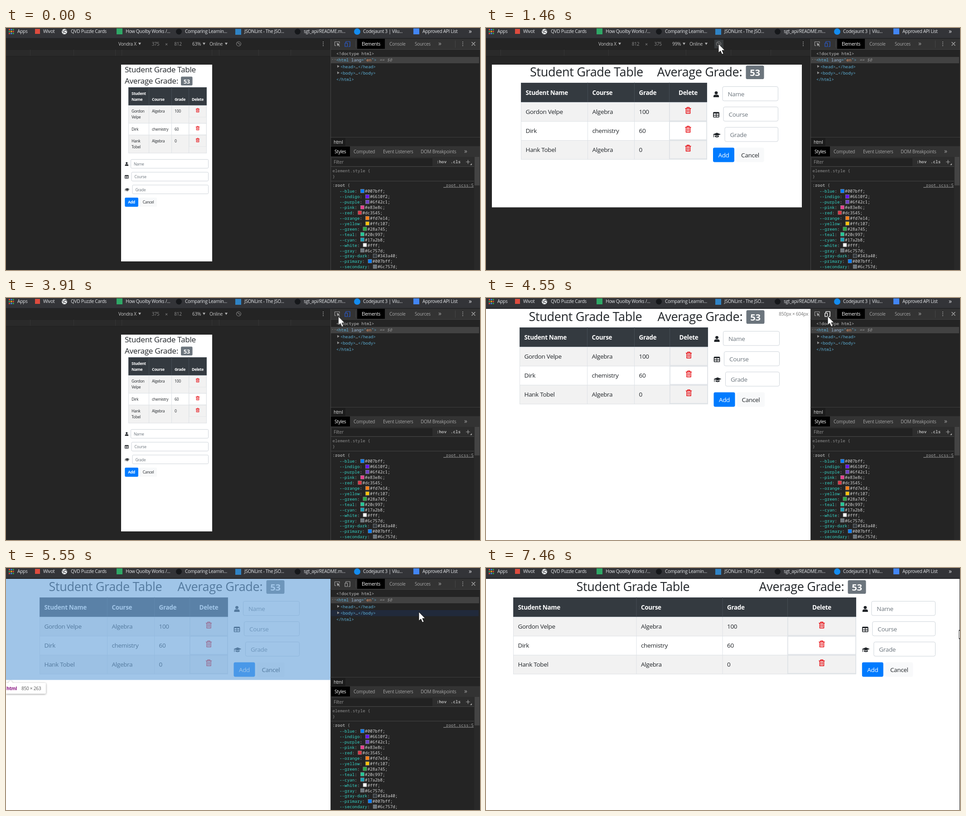
Animation, 1046 px wide and 535 px high, one loop 8 s. Source, as an HTML page:

```html
<!DOCTYPE html>
<html lang="en">
<head>
<meta charset="utf-8">
<title>Responsive grade table</title>
<style>
html, body { margin: 0; width: 100%; height: 100%; overflow: hidden; background: #242424; }
svg { display: block; width: 1046px; height: 535px; font-family: "Open Sans", "Noto Sans", sans-serif; letter-spacing: -.02em; }
text { white-space: pre; }
.mono { font-family: "Noto Sans Mono", "DejaVu Sans Mono", monospace; letter-spacing: 0; }
.line { fill: none; stroke-linecap: round; stroke-linejoin: round; }

/* 80 ms are one percent */
.timed { animation: 8s step-end infinite; }
#portrait { animation-name: portrait; }
#landscape { animation-name: landscape; }
#device { animation-name: device; }
#desktop { animation-name: desktop; }
#size { animation-name: size; }
#panel { animation-name: panel; }
#wide { animation-name: wide; }
#rotateHover { animation-name: rotate-hover; }
#iconHover { animation-name: icon-hover; }
#overlay { animation-name: overlay; }
#bodyRow { animation-name: body-row; }
#clicks { animation-name: clicks; }
#closeTip { animation-name: close-tip; }
#pointer { animation: move 8s linear infinite, appear 8s step-end infinite; }

@keyframes portrait { 0%, 30.875% { opacity: 1 } 18.25%, 56%, 100% { opacity: 0 } }
@keyframes landscape { 0%, 30.875%, 100% { opacity: 0 } 18.25% { opacity: 1 } }
@keyframes device { 0% { opacity: 1 } 56%, 100% { opacity: 0 } }
@keyframes desktop { 0%, 79.375%, 100% { opacity: 0 } 56% { opacity: 1 } }
@keyframes size { 0%, 66.4%, 100% { opacity: 0 } 56% { opacity: 1 } }
@keyframes panel { 0% { opacity: 1 } 79.375%, 100% { opacity: 0 } }
@keyframes wide { 0% { opacity: 0 } 79.375%, 100% { opacity: 1 } }
@keyframes rotate-hover { 0%, 43%, 100% { opacity: 0 } 13.6% { opacity: 1 } }
@keyframes icon-hover { 0%, 64.5%, 100% { opacity: 0 } 56% { opacity: 1 } }
@keyframes overlay { 0%, 71.5%, 100% { opacity: 0 } 66.4% { opacity: 1 } }
@keyframes body-row { 0%, 71.5%, 100% { opacity: 0 } 68.2% { opacity: 1 } }
@keyframes clicks {
  0%, 18.25%, 30.875%, 56.875%, 79.375%, 100% { opacity: 0 }
  16%, 28%, 55%, 78.5% { opacity: 1 }
}
@keyframes close-tip { 0%, 79.375%, 100% { opacity: 0 } 78.5% { opacity: 1 } }
@keyframes appear { 0% { opacity: 0 } 1.75%, 100% { opacity: 1 } }
@keyframes move {
  0%, 1.75% { transform: translate(912px, 522px); animation-timing-function: ease-in-out }
  11.125% { transform: translate(552px, 78px); animation-timing-function: ease-out }
  14.5%, 42.125% { transform: translate(513px, 35px); animation-timing-function: ease-in-out }
  45.875%, 47% { transform: translate(716px, 41px); animation-timing-function: ease-out }
  53.125%, 63.625% { transform: translate(754px, 40px); animation-timing-function: ease-in-out }
  69.375%, 70.5% { transform: translate(911px, 97px); animation-timing-function: ease-in }
  73.5% { transform: translate(985px, 62px); animation-timing-function: ease-out }
  77.5%, 79.5% { transform: translate(1026px, 33px); animation-timing-function: ease-in-out }
  84.5% { transform: translate(1035px, 126px) }
  88.375%, 92.375% { transform: translate(1037px, 130px) }
  93.25%, 100% { transform: translate(1044px, 137px) }
}
</style>
</head>
<body>
<svg id="stage" viewBox="0 0 1046 535" xmlns="http://www.w3.org/2000/svg"></svg>
<script>
const rect = (x, y, w, h, fill, more = '') =>
  `<rect x="${x}" y="${y}" width="${w}" height="${h}" fill="${fill}" ${more}/>`;
const dot = (x, y, r, fill) => `<circle cx="${x}" cy="${y}" r="${r}" fill="${fill}"/>`;
const path = (d, stroke, w = 1) => `<path class="line" d="${d}" stroke="${stroke}" stroke-width="${w}"/>`;
const shape = (d, fill) => `<path d="${d}" fill="${fill}"/>`;
// text is placed by the middle of its capitals
const text = (x, mid, size, fill, str, more = '') =>
  `<text x="${x}" y="${mid + size * .357}" font-size="${size}" fill="${fill}" ${more}>${str}</text>`;
const at = (x, y, k, body) => `<g transform="translate(${x} ${y}) scale(${k})">${body}</g>`;
const timed = (id, body) => `<g id="${id}" class="timed">${body}</g>`;
const esc = s => s.replace(/</g, '&lt;');

const BOLD = 'font-weight="700"', MID = 'text-anchor="middle"', INK = '#212529', EDGE = '#dee2e6';

const students = [['Gordon Velpe', 'Algebra', '100'], ['Dirk', 'chemistry', '60'], ['Hank Tobel', 'Algebra', '0']];
const fields = ['Name', 'Course', 'Grade'];

const trash = path('M-6-4.5H6M-2.5-4.5V-6.7H2.5V-4.5M-4.5-4.5V6.5H4.5V-4.5M-1.6-2V4M1.6-2V4', '#e6060c', 1.5);
const icons = [
  dot(0, -3.2, 3.4, INK) + shape('M-6 6.5V4.5Q-6 1-2.5 1H2.5Q6 1 6 4.5V6.5Z', INK),
  rect(-6, -5, 12, 10.5, 'none', `rx="1" stroke="${INK}" stroke-width="1.7"`) +
    rect(-6, -5.5, 12, 3, INK) + path('M0-3V5M-6 1.3H6', INK, 1.5),
  shape('M-8.5-1.6L0-5 8.5-1.6 0 2Z M-4.5 1.3V4Q0 6.5 4.5 4V1.3L0 3.2Z', INK) + path('M-7-1V4.5', INK, 1.2)
];

function input(i, x, y, right, h, k) {
  return rect(x + .5, y + .5, right - x - 1, h - 1, '#fff', `rx="${3.4 * k}" stroke="#ced4da"`) +
    text(x + (k < 1 ? 7 : 12), y + h / 2 + .8, 13.5 * k, '#6c757d', fields[i]);
}

function buttons(x, y, k) {
  return rect(x, y, 47 * k, 32 * k, '#007bff', `rx="${3.4 * k}"`) +
    text(x + 23.5 * k, y + 16.5 * k, 13.5 * k, '#fff', 'Add', MID + (k < 1 ? ' ' + BOLD : '')) +
    rect(x + 51.5 * k, y, 61 * k, 32 * k, '#f8f9fa', `rx="${3.4 * k}"`) +
    text(x + 82 * k, y + 16.5 * k, 13.5 * k, INK, 'Cancel', MID);
}

function heading(x, mid, size, str) {
  return text(x, mid, size, INK, str, 'font-weight="500"');
}

function badge(x, y, w, h, size) {
  return rect(x, y, w, h, '#6c757d', `rx="${w / 12}"`) +
    text(x + w / 2, y + h / 2 + 1, size, '#fff', '53', MID + ' ' + BOLD);
}

// cols: five vertical edges, tops: row edges from the header down
function grid(cols, tops) {
  const w = cols[4] - cols[0];
  let out = rect(cols[0], tops[0], w, tops[1] - tops[0], '#343a40');
  for (let r = 1; r < 4; r++) {
    const y = tops[r], h = tops[r + 1] - y;
    out += rect(cols[0], y, w, h, r % 2 ? '#f2f2f2' : '#fff') +
      rect(cols[0] + .5, y + .5, w - 1, h, 'none', `stroke="${EDGE}"`);
  }
  for (const x of cols.slice(1, 4))
    out += path(`M${x + .5} ${tops[0]}V${tops[1]}`, '#454d55') + path(`M${x + .5} ${tops[1]}V${tops[4]}`, EDGE);
  return out + rect(cols[0] + .5, tops[0] + .5, w - 1, tops[1] - tops[0] - 1, 'none', 'stroke="#454d55"');
}

function page({ title, avg, cols, form, right }) {
  const tops = [65, 108, 150, 192, 234], pad = 10.5;
  let out = heading(title, 41.5, 27, 'Student Grade Table') + heading(avg, 41.5, 27, 'Average Grade:') +
    badge(avg + 196, 27, 40, 30, 20.3) + grid(cols, tops);
  ['Student Name', 'Course', 'Grade'].forEach((s, i) => out += text(cols[i] + pad, 86.8, 13.5, '#fff', s, BOLD));
  const mid = (cols[3] + cols[4]) / 2;
  out += text(mid, 86.8, 13.5, '#fff', 'Delete', MID + ' ' + BOLD);
  students.forEach((row, r) => {
    row.forEach((s, i) => out += text(cols[i] + pad, 129.3 + r * 42, 13.5, INK, s));
    out += rect(cols[3] + 1, tops[r + 1] + 1, cols[4] - cols[3] - 2, 40, 'none', `stroke="${EDGE}" stroke-width="1.5"`) +
      at(mid, 126.3 + r * 41.7, 1, trash);
  });
  fields.forEach((_, i) => {
    const y = 73 + i * 45;
    out += at(form + (i === 2 ? 8.5 : 7), y + 17.5, 1, icons[i]) + input(i, form + [20.5, 22.5, 25.5][i], y, right, 32.5, 1);
  });
  return out + buttons(form, 208.5, 1);
}

function phone() {
  const cols = [270, 315, 365, 403, 443], tops = [131, 171, 210, 236, 276], k = .63;
  const put = (x, y, s, fill = INK, more = '') => text(x, y, 8.55, fill, s, more);
  const stack = (x, y, s, ...more) => s.split(' ').map((w, i) => put(x, y + i * 13, w, ...more)).join('');
  let out = rect(254, 81, 201, 435, '#fff') + heading(262, 92, 17.2, 'Student Grade Table') +
    heading(262, 117, 17.2, 'Average Grade:') + badge(386, 107.5, 25.5, 19.5, 12.9) + grid(cols, tops) +
    stack(277, 145, 'Student Name', '#fff', BOLD) + put(322, 158, 'Course', '#fff', BOLD) +
    put(372, 158, 'Grade', '#fff', BOLD) + put(423, 158, 'Delete', '#fff', BOLD + ' ' + MID);
  students.forEach(([name, course, grade], r) => {
    const y = [184, 223.5, 250][r];
    out += stack(277, y, name) + put(322, y, course) + put(372, y, grade) +
      rect(404, tops[r + 1] + 1, 38, 25, 'none', `stroke="${EDGE}" stroke-width=".7"`) + at(423, y - 2, k, trash);
  });
  fields.forEach((_, i) => {
    const y = 290 + i * 28.3;
    out += at(i === 2 ? 267.5 : 266.3, y + 10.7, k, icons[i]) + input(i, [275, 276.5, 278.5][i], y, 447, 20.5, k);
  });
  return out + buttons(262.3, 375, k);
}

function bookmarks() {
  const put = (x, s) => text(x, 7.8, 10.2, '#e4e6e9', s);
  const colors = ['#ea4335', '#fbbc05', '#34a853', '#4285f4'];
  let out = rect(0, 0, 1046, 24, '#333438') + rect(0, 22, 1046, 2, '#242528');
  for (let i = 0; i < 9; i++) out += rect(6 + i % 3 * 4.3, 2 + (i / 3 | 0) * 4.3, 3, 3, colors[(i * 3 + (i / 3 | 0)) % 4]);
  out += rect(64, 2, 11, 11, '#dd4b3e') + dot(129, 8, 6, '#f1f3f4') +
    path('M124 6Q127 9 129 6T134 7M126 11Q129 8 132 11', '#4a4c50', 1.4) +
    rect(244, 1, 13, 13, '#2fa866') + dot(381.5, 8, 6.5, '#16181b') + rect(506, 2, 13, 13, '#2f83c5') +
    dot(643.5, 8, 6.5, '#16181b') + dot(775, 8, 7, '#148cf0') + rect(899, 1, 13, 13, '#4285f4');
  [[25, 'Apps'], [82, 'Wivot'], [143, 'QVD Puzzle Cards'], [264, 'How Quolby Works /...'],
   [395, 'Comparing Learnin...'], [526, 'JSONLint - The JSO...'], [657, 'sgt_api/README.m...'],
   [788, 'Codejaunt 3 | Vilu...'], [919, 'Approved API List']].forEach(b => out += put(...b));
  return out + text(1021, 6.5, 14, '#e4e6e9', '»');
}

const dots = (x, c) => [31, 35, 39].map(y => dot(x, y, 1, c)).join('');
const caret = x => shape(`M${x - 3} 32.5H${x + 3}L${x} 37.5Z`, '#b4b4b4');

function deviceBar() {
  return rect(0, 24, 716, 511, '#252525') + rect(0, 24, 716, 23, '#242424') + rect(0, 47, 716, 15, '#2a2a2a') +
    path('M0 47.5H716M0 62.5H716', '#202020') +
    text(248, 35.5, 10.1, '#c6c6c6', 'Vondra X') + caret(295) + text(354, 36, 11, '#8b8b8b', '×', MID) +
    caret(437) + text(449, 35.5, 10.1, '#c6c6c6', 'Online') + caret(486) +
    timed('rotateHover', rect(504, 26, 20, 19, '#383b3d')) +
    `<circle cx="513.5" cy="35" r="5" fill="none" stroke="#8c8c8c"/>` + path('M510 31.5L517 38.5M513 32.5L516 35.5', '#8c8c8c') +
    dots(700, '#a8a8a8');
}

function deviceSize(w, h, zoom, ticks) {
  return text(330, 35.5, 10.1, '#8b8b8b', w, MID) + text(379.5, 35.5, 10.1, '#8b8b8b', h, MID) +
    text(411, 35.5, 10.1, '#c6c6c6', zoom) + path(ticks.map(x => `M${x + .5} 48V61`).join(''), '#353535');
}

const inspect = path('M728 39H725.5V30.5H736V33', '#a5a5a5', 1.1) + shape('M730 33L737 36 734 37 737 40 735.7 41 733 38 731.5 40.5Z', '#a5a5a5');
const toggle = c => path('M750 33V30H759V41H756M748 33.5H753.5V41H748Z', c, 1.2);

const code = (x, mid, fill, str, more = '') => text(x, mid, 9.27, fill, str, 'class="mono" ' + more);

function tree() {
  const tag = '#5db0d7', tri = y => shape(`M731 ${y - 3}L736 ${y}L731 ${y + 3}Z`, '#8f8f8f');
  const span = (fill, s) => `<tspan fill="${fill}">${esc(s)}</tspan>`;
  const node = (n, y) => tri(y - .7) + code(738, y, tag, span(tag, `<${n}>`) + span('#ccc', '…') + span(tag, `</${n}>`));
  return rect(717, 64, 327, 14, '#424242') + timed('bodyRow', rect(717, 93, 326, 13.5, '#212a3b')) +
    code(729, 56.5, '#c4c4c4', esc('<!doctype html>')) + code(718, 70, '#aaa', '···', 'letter-spacing="-2"') +
    code(728.5, 71, tag, span(tag, '<html ') + span('#9bbbdc', 'lang') + span(tag, '="') + span('#f29766', 'en') + span(tag, '">')) +
    code(824, 71, '#909090', '== $0', 'font-style="italic"') +
    node('head', 85.5) + node('body', 99.7) + code(729, 114, tag, esc('</html>'));
}

function styles() {
  const vars = { blue: '#007bff', indigo: '#6610f2', purple: '#6f42c1', pink: '#e83e8c', red: '#dc3545',
    orange: '#fd7e14', yellow: '#ffc107', green: '#28a745', teal: '#20c997', cyan: '#17a2b8', white: '#fff',
    gray: '#6c757d', 'gray-dark': '#343a40', primary: '#007bff', secondary: '#6c757d' };
  let out = code(720.5, 316, '#8d8d8d', 'element.style {') + code(720.5, 329, '#8d8d8d', '}') +
    path('M717 306.5H1033M717 338.5H1033', '#444') +
    code(720.5, 347.5, '#d8d8d8', ':root <tspan fill="#9a9a9a">{</tspan>') +
    code(1032, 347.5, '#a2a2a2', '_root.scss:5', 'text-anchor="end" text-decoration="underline"');
  Object.entries(vars).forEach(([name, color], i) => {
    const y = 361 + i * 11.93, x = 736 + (name.length + 3) * 5.56;
    out += code(736, y, '#35d4c7', `--${name}<tspan fill="#d5d5d5">:</tspan>`) +
      rect(x + 7.5, y - 4.5, 8, 8, color, 'stroke="#8a8a8a" stroke-width=".8"') + code(x + 17.2, y, '#d5d5d5', color + ';');
  });
  return out;
}

function devtools() {
  const ui = (x, y, s, fill = '#a5a5a5', more) => text(x, y, 10.1, fill, s, more);
  return rect(716, 24, 330, 511, '#242424') + rect(716, 24, 330, 23, '#333') + path('M716 47.5H1046', '#404040') +
    rect(775, 24, 61, 22, '#000') + ui(785, 35.5, 'Elements', '#fff') + ui(846, 35.5, 'Console') + ui(902, 35.5, 'Sources') +
    text(954, 34.5, 14, '#a5a5a5', '»') + path('M771.5 28V43M991.5 28V43', '#454545') + dots(1008, '#a5a5a5') +
    path('M1028 31.5L1035 38.5M1035 31.5L1028 38.5', '#b5b5b5', 1.3) + inspect + tree() +
    path('M716 241.5H1046M716 262H1046', '#3d3d3d') + rect(717, 243, 32, 18, '#1c1c1c') + ui(723, 252.5, 'html', '#e0e0e0') +
    rect(717, 262, 329, 23, '#333') + rect(717, 262, 42, 22, '#000') + ui(725, 273.5, 'Styles', '#fff') +
    ui(767, 273.5, 'Computed') + ui(832, 273.5, 'Event Listeners') + ui(915, 273.5, 'DOM Breakpoints') +
    text(1011, 272.5, 14, '#a5a5a5', '»') + rect(717, 285, 329, 21, '#2d2d2d') + rect(719, 288, 222, 17, '#222') +
    ui(723, 296.5, 'Filter', '#8d8d8d') + code(950, 296, '#b5b5b5', ':hov', BOLD) + code(981, 296, '#b5b5b5', '.cls', BOLD) +
    path('M1015.5 296H1023.5M1019.5 292V300', '#a5a5a5', 1.2) + shape('M1028 299V303H1024Z', '#a5a5a5') + styles() +
    rect(1033, 285, 13, 250, '#292929') + rect(1034, 285, 11, 63, '#444') + path('M716.5 24V535', '#474747');
}

const tooltip = `<g style="filter:drop-shadow(0 1px 2px #0006)">` +
  shape('M0 254H5L10 248 15 254H86Q88 254 88 256V276Q88 278 86 278H0Z', '#fff') + '</g>' +
  text(1, 266.5, 10.2, '#881280', 'html', BOLD) + text(34, 266.5, 10.2, '#5a5a5a', '850 × 263');

const ring = '<circle cx="-.5" cy="-1.7" r="15.3" fill="#f5dc28" fill-opacity=".78"/>';
const arrow = '<path d="M0 0V19.8L4.5 15.7 7.8 23.2 11.2 21.7 8 14.5 13.8 14.2Z" fill="#fff" stroke="#151515"/>';

document.getElementById('stage').innerHTML =
  timed('device', deviceBar()) +
  timed('portrait', deviceSize('375', '812', '63%', [53, 149, 241, 255, 454, 470, 557, 628]) + phone()) +
  timed('landscape', deviceSize('812', '375', '99%', [32, 172, 270, 441, 540, 628]) + rect(13, 81, 684, 315.5, '#fff') +
    at(0, 56, 1, page({ title: 97, avg: 377.5, cols: [77, 224, 327, 404, 488], form: 501, right: 645 }))) +
  timed('desktop', rect(0, 24, 716, 511, '#fff') +
    page({ title: 94.5, avg: 378.5, cols: [74, 223, 327, 405, 490], form: 502.5, right: 648 }) +
    timed('size', text(711, 35.5, 10.2, '#777', '850px × 604px', 'text-anchor="end"')) +
    timed('overlay', rect(0, 24, 716, 223.5, '#6fa8dc', 'fill-opacity=".66"') + tooltip)) +
  timed('panel', devtools() + at(0, 0, 1, `<g class="timed" style="animation-name:device">${toggle('#2a5bd0')}</g>` +
    `<g class="timed" style="animation-name:desktop">${toggle('#a5a5a5')}</g>`) +
    timed('iconHover', toggle('#fff')) + timed('closeTip', text(1023, 59.5, 10.1, '#3d3d3d', 'Close', MID))) +
  timed('wide', rect(0, 24, 1046, 511, '#fff') +
    page({ title: 199.5, avg: 602.5, cols: [60, 331.5, 521.5, 665, 817], form: 829.8, right: 992 }) + rect(1045, 24, 1, 511, '#2b2b2b')) +
  bookmarks() +
  `<g id="pointer">${timed('clicks', ring)}${arrow}</g>`;
</script>
</body>
</html>
```
